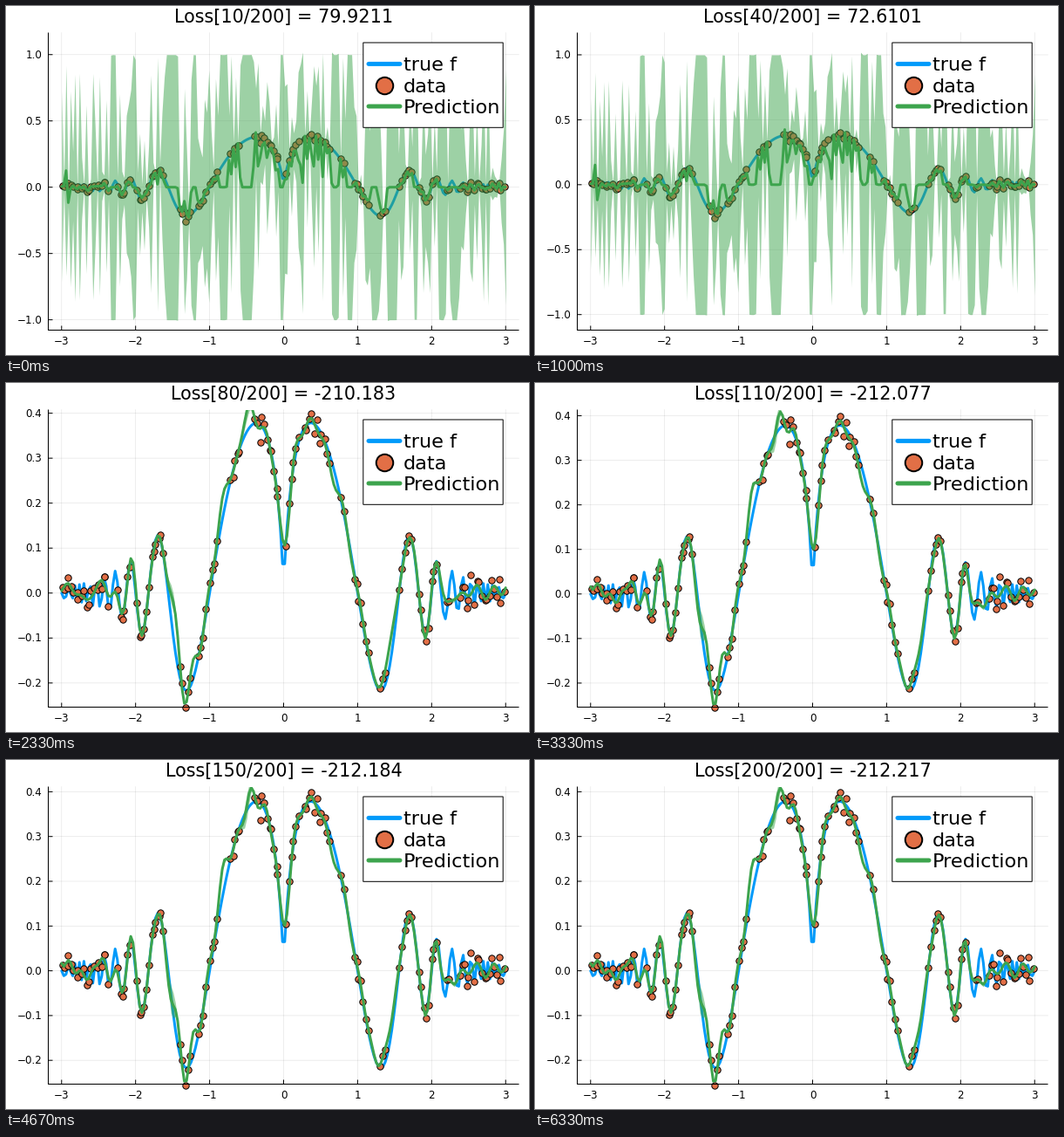
Write a matplotlib script that moves like this. It is 600 by 400 pixels and loops after 6.66 s.

```python
import matplotlib.pyplot as plt
import numpy as np
from matplotlib.animation import FuncAnimation
from matplotlib.patches import Rectangle

plt.rcParams["font.family"] = "DejaVu Sans"
plt.rcParams["path.snap"] = False

W, H, DPI = 600, 400, 100
PT = 72 / DPI                      # points per pixel
BLUE, ORANGE, GREEN = "#009AFA", "#E26F46", "#3DA44D"
RIGHT, TOP, BOTTOM = 588.5, 30.5, 371.5
STEPS, LOOP, TICK = 20, 6660, 30   # plots per loop, times in ms

# Training progress at a few steps; everything between is interpolated.
KEY_STEPS = [0, 1, 4, 5, 6, 7, 10, 14, 19]
KEYS = {
    "loss": [79.9211, 95.5204, 61.155, -151.724, -204.638,
             -210.183, -212.077, -212.184, -212.217],
    "length": [.0135, .0105, .0165, .08, .1, .12, .11, .11, .11],
    "noise": [.01, .01, .01, .02, .022, .024, .02, .02, .02],
    "low": [-1.078, -1.087, -1.136, -.62, -.32, -.2537, -.254, -.2532, -.2532],
    "high": [1.166, 1.145, 1.184, .76, .48, .408, .4138, .4115, .4115],
}

# Stretches of the x axis that hold samples, with gaps between them.
RUNS = [(-3, -2.37), (-2.25, -2.08), (-1.98, -1.63), (-1.4, -1.26),
        (-1.15, -.9), (-.73, -.6), (-.39, -.07), (.03, .21), (.28, .62),
        (.77, .82), (.96, 1.15), (1.3, 1.37), (1.56, 1.74), (1.82, 2.07),
        (2.21, 2.23), (2.37, 2.98)]
DENSITY = 30                       # samples per unit

rng = np.random.default_rng(4)


def true_f(x):
    return np.sinc(np.abs(x) ** np.abs(x))


def scatter(start, end):
    x = np.linspace(start, end, 1 + round((end - start) * DENSITY))
    return np.clip(x + rng.uniform(-.018, .018, len(x)), start, end)


xs = np.concatenate([scatter(*run) for run in RUNS])
ys = true_f(xs) + rng.normal(0, .013, len(xs))
grid = np.linspace(-3, 3, 200)


def progress(name, i):
    return np.interp(i, KEY_STEPS, KEYS[name])


def kernel(a, b, length):
    return np.exp(-0.5 * ((a[:, None] - b[None, :]) / length) ** 2)


def posterior(i):
    """Mean and variance of a Gaussian process fitted to the samples."""
    length = progress("length", i)
    cov = kernel(xs, xs, length) + progress("noise", i) ** 2 * np.eye(len(xs))
    cross = kernel(grid, xs, length)
    mean = cross @ np.linalg.solve(cov, ys)
    var = 1 - np.sum(cross * np.linalg.solve(cov, cross.T).T, axis=1)
    return mean, np.clip(var, 0, 1)


fig = plt.figure(figsize=(W / DPI, H / DPI), dpi=DPI, facecolor="white")
ax = fig.add_axes([0, 0, 1, 1])


def line(x, y, color, width, cap="round", **kw):
    return ax.plot(x, y, color=color, lw=width * PT, solid_capstyle=cap,
                   solid_joinstyle="round", **kw)[0]


def text(x, y, s, size, ha):
    ax.text(x, y, s, fontsize=size * PT, ha=ha, va="baseline",
            color="black", zorder=12)


def dots(x, y, size, edge, zorder):
    ax.plot(x, y, "o", ms=size * PT, mfc=ORANGE, mec="black",
            mew=edge * PT, zorder=zorder)


def tick_text(value, digits):
    return f"{value:.{digits}f}".replace("-", "\u2212")


def draw_axes(left, to_x, to_y, step):
    for k in range(-3, 4):
        x = to_x(k)
        line([x, x], [TOP, BOTTOM], "black", 0.7, alpha=0.1, zorder=1)
        line([x, x], [BOTTOM - 5, BOTTOM], "black", 1, "butt", zorder=8)
        text(x, 387.6, tick_text(k, 0), 11.9, "center")
    for k in range(-8, 9):
        y = to_y(k * step)
        if TOP <= y <= BOTTOM:
            line([left, RIGHT], [y, y], "black", 0.7, alpha=0.1, zorder=1)
            line([left, left + 5], [y, y], "black", 1, "butt", zorder=8)
            label = tick_text(k * step, 2 if step == 0.25 else 1)
            text(left - 7.2, y + 4.2, label, 11.9, "right")
    line([left, left, RIGHT], [TOP, BOTTOM, BOTTOM], "black", 1, "butt",
         zorder=8)


def draw_legend():
    ax.add_patch(Rectangle((409.8, 42), 160.4, 97.3, fc="white", ec="black",
                           lw=PT, zorder=10))
    line([416, 452], [66.4, 66.4], BLUE, 5, zorder=11)
    dots([433.5], [90.8], 19.5, 2, zorder=11)
    line([416, 452], [115, 115], GREEN, 5, zorder=11)
    for row, label in enumerate(["true f", "data", "Prediction"]):
        text(456, 74.4 + 24.3 * row, label, 22.4, "left")


def draw_plot(i):
    ax.clear()
    ax.set_xlim(0, W)
    ax.set_ylim(H, 0)
    ax.axis("off")

    low, high = progress("low", i), progress("high", i)
    span = high - low
    step = 0.1 if span < 0.85 else 0.25 if span < 1.7 else 0.5
    left = 56.5 if step == 0.25 else 48.5
    middle, x_unit = (left + RIGHT) / 2, (RIGHT - left) / 6.36

    def to_x(v):
        return middle + v * x_unit

    def to_y(v):
        return TOP + (high - v) / span * (BOTTOM - TOP)

    mean, var = posterior(i)
    px = to_x(grid)
    draw_axes(left, to_x, to_y, step)
    line(px, to_y(true_f(grid)), BLUE, 3, zorder=3)
    dots(to_x(xs), to_y(ys), 7.4, 1, zorder=4)
    ribbon = ax.fill_between(px, to_y(mean - var), to_y(mean + var),
                             color=GREEN, alpha=0.5, lw=0, zorder=5)
    curve = line(px, to_y(mean), GREEN, 3, zorder=6)
    for artist in (ribbon, curve):
        artist.set_clip_path(Rectangle((left, TOP), RIGHT - left, BOTTOM - TOP,
                                       transform=ax.transData))
    draw_legend()
    title = f"Loss[{10 * (i + 1)}/200] = {progress('loss', i):.6g}"
    text(middle, 18.7, title, 20.8, "center")


shown = None


def reset():
    global shown
    shown = None
    return []


def draw(tick):
    """Redraw only when the next plot is due."""
    global shown
    step = int((tick + 1) * TICK * STEPS / LOOP - 1e-6)
    step = min(step, STEPS - 1)
    if step != shown:
        draw_plot(step)
        shown = step
    return []


anim = FuncAnimation(fig, draw, frames=LOOP // TICK, interval=TICK,
                     init_func=reset, repeat=True, repeat_delay=0, blit=False)
plt.show()
```
